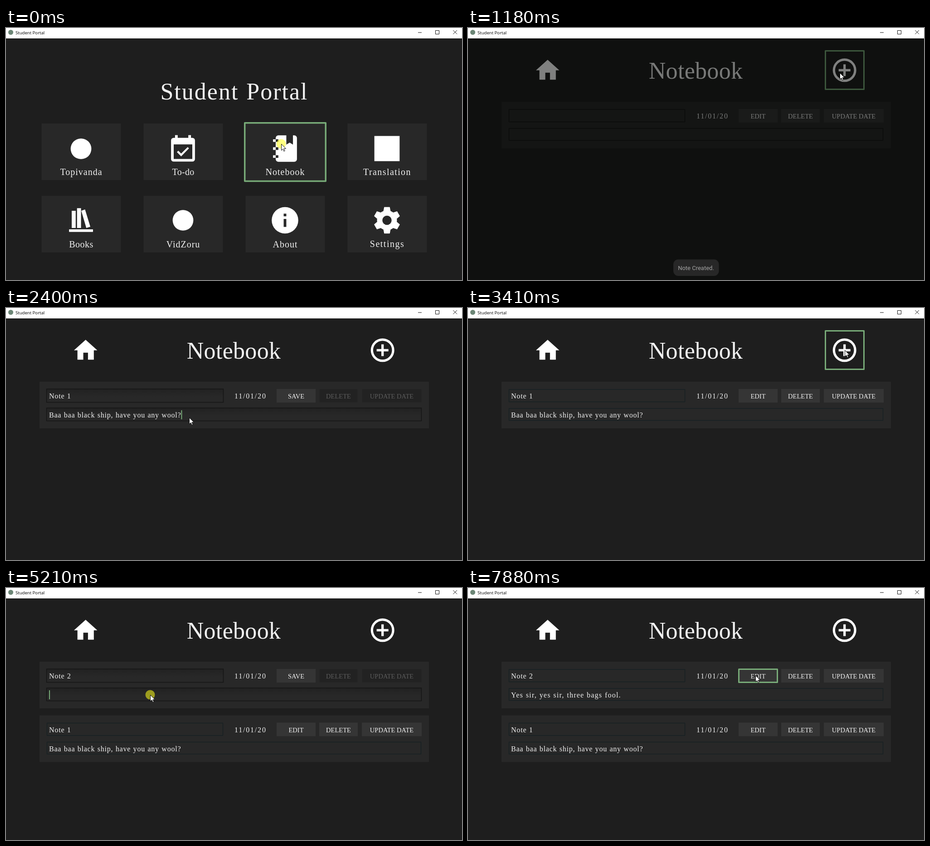
Animation, 1006 px wide and 557 px high, one loop 8 s. Source, as an HTML page with a canvas:

```html
<!DOCTYPE html>
<html lang="en">
<head>
<meta charset="utf-8">
<title>Student Portal</title>
<style>
  html, body { margin: 0; width: 100%; height: 100%; overflow: hidden; background: #1e1e1e; }
  canvas { display: block; width: 1006px; height: 557px; }
</style>
</head>
<body>
<canvas id="stage" width="1006" height="557"></canvas>
<script>
const ctx = document.getElementById('stage').getContext('2d');
const W = 1006, H = 557, BAR = 23, LOOP = 8000;
const SERIF = '"Liberation Serif", serif';
const GREEN = '#78ab78', INK = '#f2f2f2';

const home = new Path2D('M10,20V14H14V20H19V12H22L12,3L2,12H5V20Z');
const calendar = new Path2D('M19,19H5V8H19ZM19,3H18V1H16V3H8V1H6V3H5A2,2 0 0,0 3,5V19A2,2 0 0,0 5,21H19A2,2 0 0,0 21,19V5A2,2 0 0,0 19,3ZM16.5,11L15.5,10L10.6,14.9L8.5,12.8L7.4,13.8L10.6,17Z');
const binder = new Path2D('M3,7V5H5V4A2,2 0 0,1 7,2H13V9L15.5,7.5L18,9V2H19A2,2 0 0,1 21,4V20A2,2 0 0,1 19,22H7A2,2 0 0,1 5,20V19H3V17H5V13H3V11H5V7ZM7,11H5V13H7ZM7,7V5H5V7ZM7,19V17H5V19Z');
const shelf = new Path2D('M9,3V18H12V3ZM12.2,5L16,18L19,17L15,4ZM5,5V18H8V5ZM3,19V21H21V19Z');

const clamp = v => Math.max(0, Math.min(1, v));
const ramp = (t, a, b) => clamp((t - a) / (b - a));

function rect(x, y, w, h, fill) {
  ctx.fillStyle = fill;
  ctx.fillRect(x, y, w, h);
}

function outline(x, y, w, h, color, line) {
  ctx.strokeStyle = color;
  ctx.lineWidth = line;
  ctx.lineJoin = 'round';
  ctx.strokeRect(x, y, w, h);
}

function disc(x, y, r, fill) {
  ctx.fillStyle = fill;
  ctx.beginPath();
  ctx.arc(x, y, r, 0, 7);
  ctx.fill();
}

function text(str, x, y, size, o = {}) {
  ctx.font = size + 'px ' + (o.font || SERIF);
  ctx.letterSpacing = (o.track || 0) + 'px';
  ctx.wordSpacing = (o.word || 0) + 'px';
  ctx.textAlign = o.align || 'center';
  ctx.fillStyle = o.color || INK;
  ctx.fillText(str, x, y);
  return ctx.measureText(str).width;
}

// Icons live on a 24-unit grid centred at (x, y).
function icon(x, y, scale, draw) {
  ctx.save();
  ctx.translate(x, y);
  ctx.scale(scale, scale);
  ctx.translate(-12, -12);
  ctx.fillStyle = ctx.strokeStyle = '#fff';
  draw();
  ctx.restore();
}
const shape = path => () => ctx.fill(path, 'evenodd');

function info() {
  disc(12, 12, 10, '#fff');
  rect(11, 7, 2, 2, '#282828');
  rect(11, 11, 2, 6, '#282828');
}

function cog() {
  disc(12, 12, 7.5, '#fff');
  for (let i = 0; i < 6; i++) {
    ctx.save();
    ctx.translate(12, 12);
    ctx.rotate(i * Math.PI / 3);
    ctx.beginPath();
    ctx.moveTo(-2.9, -6);
    ctx.lineTo(-2.1, -10);
    ctx.lineTo(2.1, -10);
    ctx.lineTo(2.9, -6);
    ctx.fill();
    ctx.restore();
  }
  disc(12, 12, 3.5, '#282828');
}

function plus() {
  ctx.lineWidth = 2;
  ctx.beginPath();
  ctx.arc(12, 12, 9, 0, 7);
  ctx.stroke();
  rect(11, 7, 2, 10, '#fff');
  rect(7, 11, 10, 2, '#fff');
}

const dot = () => disc(12, 12, 7.8, '#fff');
const block = () => rect(2.5, 2.5, 19, 19, '#fff');

// label, tracking, icon, icon centre y, baseline
const tiles = [
  ['Topivanda', 1, dot, 267, 325], ['To-do', 0.3, shape(calendar), 269, 325],
  ['Notebook', 1, shape(binder), 266.5, 325], ['Translation', 1.4, block, 266.5, 325],
  ['Books', 0.5, shape(shelf), 424.5, 485], ['VidZoru', 1, dot, 425, 485],
  ['About', 1, info, 425, 485], ['Settings', 1.5, cog, 425, 484]
];

function drawMenu() {
  text('Student Portal', 503.5, 158, 52, { track: 2, word: 2 });
  tiles.forEach(([label, track, art, iy, base], i) => {
    const x = 78.5 + 225 * (i % 4), y = i < 4 ? 211 : 371;
    rect(x, y, 175, 125, '#282828');
    icon(x + 87, iy, 2.93, art);
    text(label, x + 87.5, base, 20, { track });
  });
  outline(526.75, 209.75, 178.5, 128.75, GREEN, 3.5);
}

// Pointer path: time, x, y
const path = [
  [0, 607, 256], [440, 607, 256], [830, 820, 99], [1240, 820, 99], [1700, 640, 194],
  [1800, 640, 194], [1950, 420, 192], [2010, 404, 242], [2600, 404, 242], [2850, 640, 195],
  [2960, 640, 195], [3390, 831, 93], [3879, 831, 93], [3880, 931, 54], [4270, 931, 54],
  [4480, 640, 194], [4560, 640, 194], [4740, 340, 190], [5000, 340, 190], [5080, 318, 236],
  [7150, 318, 236], [7400, 747, 166], [7540, 690, 178], [7680, 634, 193], [8000, 634, 193]
];
// Click glow: from, to
const clicks = [
  [0, 130], [830, 900], [1740, 1810], [2020, 2090], [2900, 2970], [3740, 3880],
  [4530, 4600], [4680, 4750], [5210, 5340], [7680, 7880]
];

function pointerAt(t) {
  const i = Math.max(1, path.findIndex(k => k[0] > t));
  const a = path[i - 1], b = path[i], p = ramp(t, a[0], b[0]);
  const e = p * p * (3 - 2 * p);
  return { x: a[1] + (b[1] - a[1]) * e, y: a[2] + (b[2] - a[2]) * e };
}

const inside = (m, x, y, w, h) => m.x >= x && m.x <= x + w && m.y >= y && m.y <= y + h;

function button(label, x, y, w, on, m) {
  if (on) rect(x, y, w, 30, '#353535');
  else rect(x + 0.5, y + 0.5, w - 1, 29, '#222');
  text(label, x + w / 2, y + 21, 14.5, { color: on ? INK : '#5c5c5c' });
  if (on && inside(m, x, y, w, 30)) outline(x + 0.5, y + 0.5, w - 1, 29, GREEN, 3);
}

function field(str, x, y, w, h, track, edit, caret) {
  if (edit) {
    const g = ctx.createLinearGradient(0, y, 0, y + h);
    g.addColorStop(0, '#222');
    g.addColorStop(0.6, '#282828');
    rect(x - 0.5, y - 0.5, w + 1, h + 1, g);
    outline(x - 0.5, y - 0.5, w + 1, h + 1, '#151515', 1.5);
  } else {
    outline(x + 0.5, y + 0.5, w - 1, h - 1, str ? '#172023' : '#171717', 1.5);
  }
  const end = 95 + text(str, 95, y + 20.5, 16, { align: 'left', track, word: 0.6 });
  if (caret) rect(end, y + 4.5, 2, 20, GREEN);
}

function drawNote(n, y, m) {
  rect(74, y, 859, 103, '#282828');
  field(n.title, 90, y + 16.5, 389, 28.5, 0.8, n.edit, n.caret === 1);
  field(n.body, 90, y + 58.5, 826, 27.5, n.track, n.edit, n.caret === 2);
  text('11/01/20', 504, y + 37, 16, { align: 'left', track: 1.8 });
  button(n.edit ? 'SAVE' : 'EDIT', 597, y + 16, 86, true, m);
  button('DELETE', 691, y + 16, 85, !n.edit, m);
  button('UPDATE DATE', 785, y + 16, 132, !n.edit, m);
}

function firstNote(t) {
  const line = 'Baa baa black ship, have you any wool?';
  const edit = t >= 1810 && t < 2940;
  return {
    edit, track: 0.8,
    title: t >= 1950 ? 'Note 1' : '',
    body: line.slice(0, t >= 2400 ? line.length : t >= 2210 ? 13 : 0),
    caret: !edit || t < 1880 ? 0 : t < 2020 ? 1 : 2
  };
}

function secondNote(t) {
  const line = 'Yes sir, yes sir, three bags fool.';
  const edit = t >= 4560 && t < 7880;
  let count = t < 5340 ? 0 : 3;
  if (t >= 5540) count = Math.min(13, 6 + Math.floor((t - 5540) / 70) * 7 / 3);
  if (t >= 5950) {
    const step = Math.min(8, Math.floor((t - 5950) / 112) + 1);
    count = 13 + Math.ceil(21 * step / 8);
  }
  const blink = t >= 6940 && t < 7270;
  return {
    edit, track: 1.2,
    title: t >= 5010 ? 'Note 2' : '',
    body: line.slice(0, count),
    caret: !edit || t < 4750 || blink ? 0 : t < 5210 ? 1 : 2
  };
}

function drawNotebook(t, m) {
  icon(175.7, 93.5, 2.58, shape(home));
  text('Notebook', 502.5, 112, 52, { track: 0.3 });
  icon(830.7, 93.3, 2.6, plus);
  const held = t >= 3880 && t < 4280;
  if (t > 490 && (held || inside(m, 787, 49, 88, 88))) outline(788.5, 50.5, 85, 85, GREEN, 3);
  if (t >= 4280) {
    drawNote(secondNote(t), 163, m);
    drawNote(firstNote(t), 281.5, m);
  } else if (t >= 830) {
    drawNote(firstNote(t), 163, m);
  }
}

function drawToast(t) {
  const a = ramp(t, 870, 1130) * (1 - ramp(t, 1400, 1740));
  if (!a) return;
  ctx.save();
  ctx.globalAlpha = a;
  rect(0, BAR, W, H - BAR, 'rgba(0,2,1,.5)');
  ctx.fillStyle = '#272727';
  ctx.beginPath();
  ctx.roundRect(453, 511.5, 100.5, 36.5, 11);
  ctx.fill();
  text('Note Created.', 503, 534.5, 13, { font: 'Roboto, sans-serif', color: '#a4a4a4' });
  ctx.restore();
}

function drawBar() {
  rect(0, 0, W, BAR, '#fff');
  disc(10.5, 9.5, 5.5, '#6c8676');
  text('Student Portal', 21, 13.5, 9.6, { font: '"Open Sans", sans-serif', align: 'left', color: '#000' });
  rect(909, 9.5, 8, 1, '#111');
  outline(947.5, 5.5, 8, 8, '#111', 1);
  ctx.beginPath();
  ctx.moveTo(986.5, 5);
  ctx.lineTo(995, 13.5);
  ctx.moveTo(995, 5);
  ctx.lineTo(986.5, 13.5);
  ctx.stroke();
}

const arrow = new Path2D('M0,0V14L3.3,11L5.5,16L7.7,15L5.5,10.2H10Z');

function drawPointer(t, m) {
  if (clicks.some(([a, b]) => t >= a && t < b)) disc(m.x, m.y, 10.5, 'rgba(255,255,25,.55)');
  ctx.save();
  ctx.translate(m.x + 0.5, m.y + 0.5);
  ctx.fillStyle = '#fff';
  ctx.strokeStyle = '#111';
  ctx.lineWidth = 1;
  ctx.fill(arrow);
  ctx.stroke(arrow);
  ctx.restore();
}

function draw(t) {
  // The opening section advances in visible 70 ms ticks.
  const tick = t < 130 ? 0 : t < 2400 ? 130 + 70 * Math.floor((t - 130) / 70) : t;
  const m = pointerAt(tick);
  const left = (1 - ramp(tick, 90, 490)) ** 2;
  const span = H - BAR;

  rect(0, 0, W, H, '#1e1e1e');
  ctx.save();
  ctx.translate(0, -span * left);
  drawNotebook(t, m);
  ctx.restore();
  if (left > 0) {
    ctx.save();
    ctx.translate(0, span * (1 - left));
    drawMenu();
    ctx.restore();
  }
  drawToast(tick);
  drawBar();
  drawPointer(t, m);
}

const start = performance.now();
function loop() {
  draw((performance.now() - start) % LOOP);
  requestAnimationFrame(loop);
}
loop();
</script>
</body>
</html>
```
